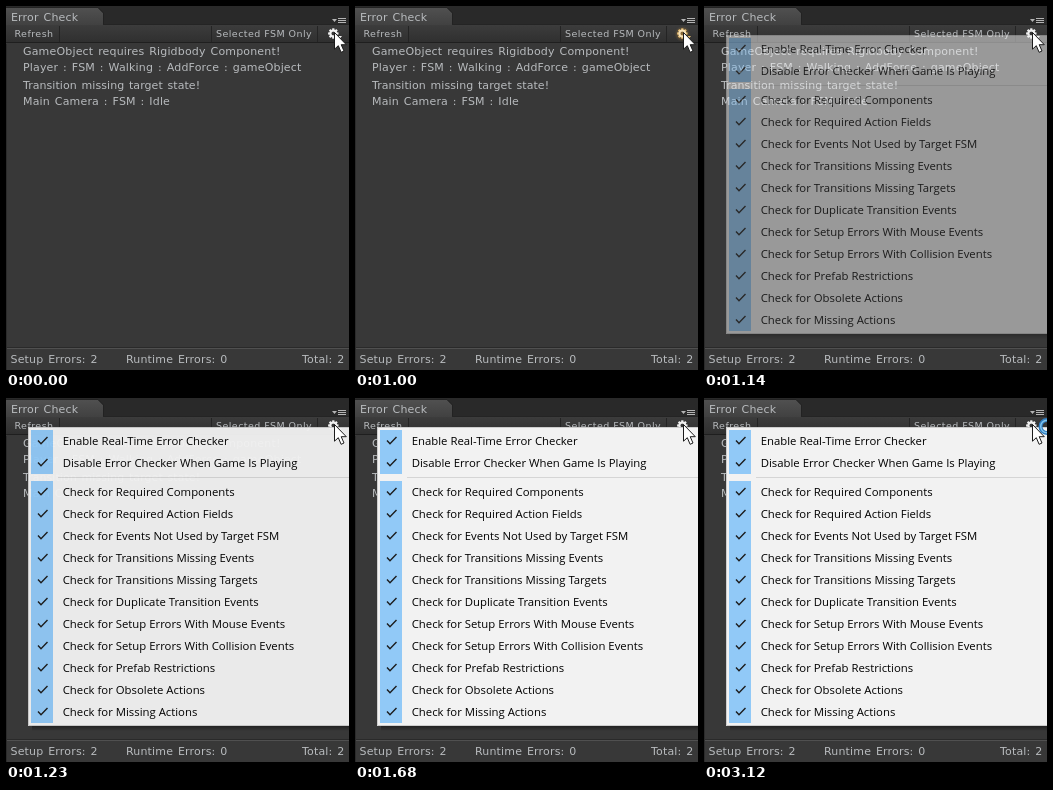
Recreate the animation shown at these times as an HTML page. Size 343 by 364 pixels, loop 3.92 s.

```html
<!DOCTYPE html>
<html lang="en">
<head>
<meta charset="utf-8">
<title>Error Check</title>
<style>
  html, body { margin: 0; width: 100%; height: 100%; overflow: hidden; background: #383838; }
  svg { display: block; width: 343px; height: 364px; }
  text { white-space: pre; }
  .panel { font: 11px "DejaVu Sans", Verdana, sans-serif; fill: #b8bbbe; letter-spacing: .17px; word-spacing: 1.2px; }
  .bar { font-size: 9.5px; letter-spacing: .45px; word-spacing: 0; }
  .menu { font: 11.35px "Open Sans", "Segoe UI", sans-serif; fill: #000; }
</style>
</head>
<body>
<svg viewBox="0 0 343 364" xmlns="http://www.w3.org/2000/svg">
  <defs>
    <linearGradient id="tabFill" x2="0" y2="1">
      <stop stop-color="#505050"/><stop offset="1" stop-color="#414141"/>
    </linearGradient>
    <linearGradient id="barFill" x2="0" y2="1">
      <stop stop-color="#3c3c3c"/><stop offset="1" stop-color="#2f2f2f"/>
    </linearGradient>
    <linearGradient id="shade" x2="0" y2="1">
      <stop stop-color="#000" stop-opacity=".4"/><stop offset="1" stop-color="#000" stop-opacity="0"/>
    </linearGradient>
    <radialGradient id="glow">
      <stop stop-color="#d89a3c" stop-opacity=".6"/><stop offset="1" stop-color="#d89a3c" stop-opacity="0"/>
    </radialGradient>
  </defs>

  <rect width="343" height="364" fill="#383838"/>
  <rect width="343" height="20" fill="#292929"/>
  <path d="M0 19V2H92L97 7V19Z" fill="url(#tabFill)"/>
  <path d="M0 1.500H92L97.500 7V19" fill="none" stroke="#222"/>
  <rect y="19" width="343" height="18" fill="url(#barFill)"/>
  <path d="M97 18.500H343M53.500 20V37M205.500 20V37M311.500 20V37" stroke="#242424"/>
  <path d="M0 36.500H343" stroke="#1f1f1f"/>
  <path d="M326 13H331L328.500 16Z" fill="#b4b4b4"/>
  <path d="M332 12.500H340M332 14.500H340M332 16.500H340" stroke="#b4b4b4"/>
  <path d="M0 341.500H343" stroke="#2a2a2a"/>
  <path d="M0 342.500H343" stroke="#505050"/>
  <path d="M.5 38V364" stroke="#2b2b2b"/>
  <g id="panel" class="panel"></g>

  <circle id="halo" cx="327.500" cy="28" r="8" fill="url(#glow)"/>
  <g id="gear"></g>

  <g id="menu" class="menu">
    <rect x="26" y="328" width="317" height="5" fill="url(#shade)"/>
    <rect x="22" y="29" width="330" height="299" fill="#f2f2f2"/>
    <path d="M352 29.500H22.500V327.500H352" fill="none" stroke="#cdcdcd"/>
    <path d="M25 32h22v44h-22zM25 83h22v242h-22z" fill="#91c9f7"/>
    <path d="M52 79.500H343" stroke="#d5d5d5"/>
  </g>

  <path d="M328.500 26.500V43.200L332.300 39.700L335.100 46.300L338 45L335.200 38.700H340.300Z"
        fill="#fff" stroke="#1c1c1c"/>
  <g id="busy" fill="none">
    <circle cx="343" cy="28.500" r="6.500" stroke="#2f7dc0" stroke-width="4"/>
    <circle cx="343" cy="28.500" r="6.300" stroke="#83c5ec" stroke-width="1.400"/>
  </g>
</svg>
<script>
const LOOP = 3920;
const FADE = [[1140, .52], [1230, .955], [1310, 1]];
const HOVER = [1000, 1060];
const BUSY_START = 1920;

const byId = id => document.getElementById(id);

function add(parent, tag, attrs, label = '') {
  const node = document.createElementNS('http://www.w3.org/2000/svg', tag);
  for (const key in attrs) node.setAttribute(key, attrs[key]);
  node.textContent = label;
  parent.appendChild(node);
  return node;
}

const panel = byId('panel'), gear = byId('gear'), menu = byId('menu');
const halo = byId('halo'), busy = byId('busy');

const label = (x, y, words, extra) => add(panel, 'text', { x, y, ...extra }, words);
label(5, 15, 'Error Check');
label(8.5, 31, 'Refresh', { class: 'bar' });
label(210, 31, 'Selected FSM Only', { class: 'bar' });
label(17, 49, 'GameObject requires Rigidbody Component!');
label(17, 65, 'Player : FSM : Walking : AddForce : gameObject');
label(17, 83, 'Transition missing target state!', { style: 'letter-spacing:.06px' });
label(17, 99, 'Main Camera : FSM : Idle');
label(4.5, 357, 'Setup Errors: 2');
label(120, 357, 'Runtime Errors: 0');
label(296, 357, 'Total: 2');

for (let angle = 0; angle < 360; angle += 45) {
  add(gear, 'rect', { x: 326.2, y: 22.3, width: 2.2, height: 3, transform: `rotate(${angle} 327.3 27.5)` });
}
const hub = add(gear, 'circle', { cx: 327.3, cy: 27.5, r: 2.9, fill: 'none', 'stroke-width': 2 });
add(gear, 'path', { d: 'M332 30h4l-2 2.500z' });

const items = [
  'Enable Real-Time Error Checker',
  'Disable Error Checker When Game Is Playing',
  ...['Required Components', 'Required Action Fields', 'Events Not Used by Target FSM',
    'Transitions Missing Events', 'Transitions Missing Targets', 'Duplicate Transition Events',
    'Setup Errors With Mouse Events', 'Setup Errors With Collision Events',
    'Prefab Restrictions', 'Obsolete Actions', 'Missing Actions'].map(name => 'Check for ' + name)
];
items.forEach((item, i) => {
  const middle = 43 + i * 22 + (i > 1 ? 7 : 0);
  add(menu, 'path', {
    d: `M32 ${middle - .5}l3 3.200l6.500 -6.700`, fill: 'none', stroke: '#1c1c1c', 'stroke-width': 1.4
  });
  add(menu, 'text', { x: 56.7, y: middle + 4 }, item);
});

function render(time) {
  const t = time % LOOP;
  const hover = t >= HOVER[0] && t < HOVER[1];
  const opacity = FADE.reduce((value, [start, next]) => t >= start ? next : value, 0);
  gear.setAttribute('fill', hover ? '#e6bd72' : '#f0f0f0');
  hub.setAttribute('stroke', hover ? '#f6e2b8' : '#f0f0f0');
  halo.setAttribute('opacity', hover ? 1 : 0);
  menu.setAttribute('opacity', opacity);
  busy.setAttribute('opacity', t >= BUSY_START ? 1 : 0);
}

function tick() {
  render(performance.now());
  requestAnimationFrame(tick);
}
tick();
</script>
</body>
</html>
```
